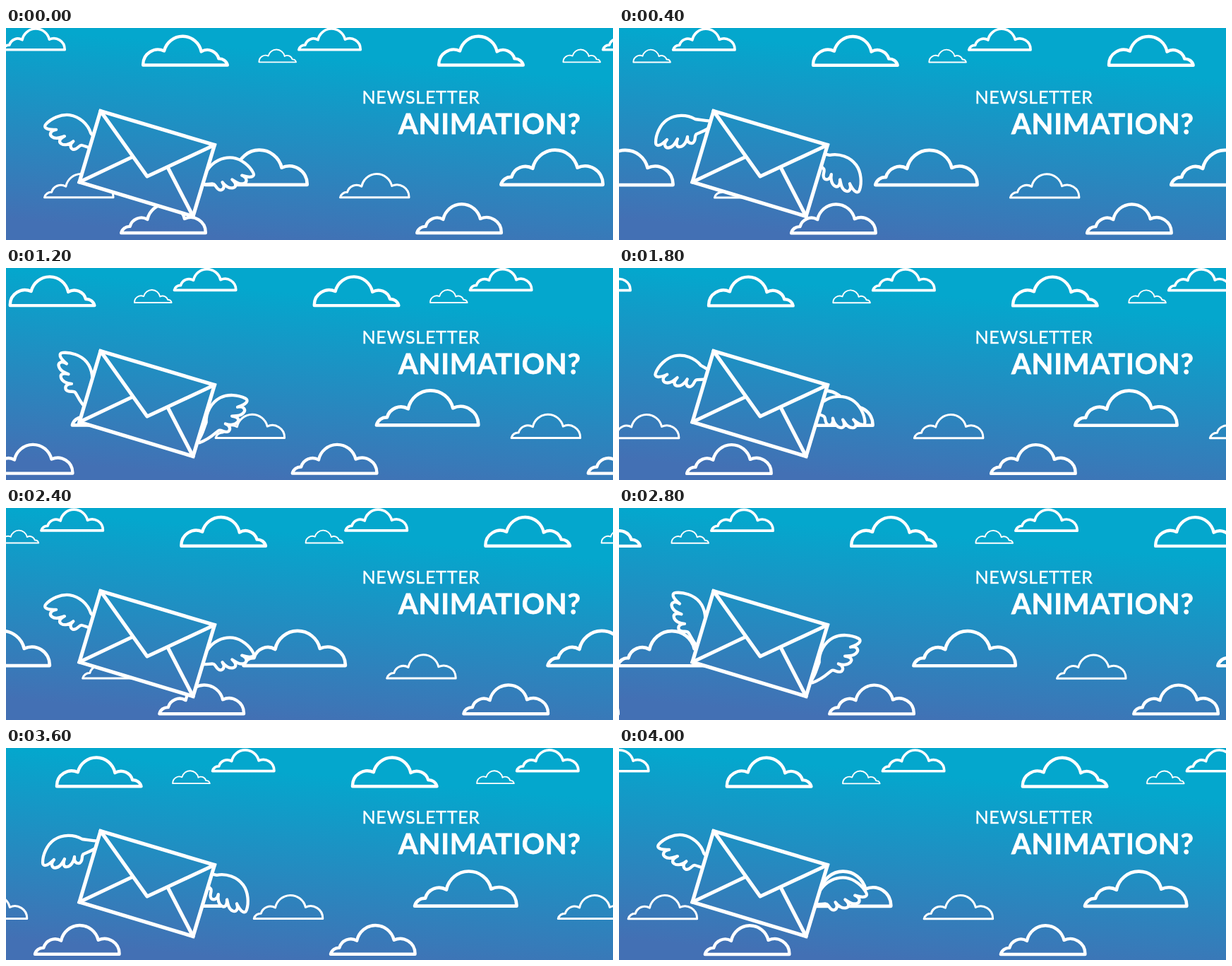
Recreate the animation shown at these times as an HTML page. Size 860 by 300 pixels, loop 4200 ms.

```html
<!DOCTYPE html>
<html lang="en">
<head>
<meta charset="utf-8">
<title>Newsletter animation</title>
<style>
  html, body { margin: 0; width: 100%; height: 100%; overflow: hidden; }
  svg { display: block; width: 860px; height: 300px; }
  .line { fill: url(#sky); stroke: #fff; stroke-linejoin: round; stroke-linecap: round; }
  text { fill: #fff; stroke: #fff; font-family: Lato, "Open Sans", sans-serif; }
</style>
</head>
<body>
<svg viewBox="0 0 860 300">
  <defs>
    <linearGradient id="sky" gradientUnits="userSpaceOnUse" x1="0" y1="0" x2="-23" y2="268">
      <stop offset="0" stop-color="#04a7cd"/>
      <stop offset="1" stop-color="#4370b4"/>
    </linearGradient>
    <linearGradient id="sky0" href="#sky"/>
    <linearGradient id="sky1" href="#sky"/>
    <path id="cloud" vector-effect="non-scaling-stroke"
      d="M2.3 50.3A14 14 0 0 1 17 39.500A20 20 0 0 1 46.500 27.500A32 32 0 0 1 109 26.500A25 25 0 0 1 144.500 49V50.300Z"/>
    <path id="wing"
      d="M50 -24C38 -22 30 -25 20 -26C8 -33 -8 -33 -20 -25C-30 -18 -36 -4 -36 7C-36 13 -30 13 -20 3C-26 10 -22 15 -18 14.500C-12 14 -9 9 -5 2C-8 10 -6 14 -1 13C4 12 8 6 9 -1C8 6 12 9 16 8C22 5 18 -3 22 -5C27 -8 36 -9 50 -21"/>
  </defs>
  <rect width="860" height="300" fill="url(#sky)"/>
  <g id="clouds"></g>
  <g id="wings"></g>
  <g class="line" stroke-width="5.2">
    <path d="M134 117.500L295.500 165.500L265 266.500L104 218Z" stroke-linejoin="miter"/>
    <path d="M134 117.500L200 210L295.500 165.500M104 218L180 182M265 266.500L229 197" fill="none"/>
  </g>
  <text x="504.500" y="107" font-size="25" letter-spacing="0.75" stroke-width="0.4">NEWSLETTER</text>
  <text x="556" y="150" font-size="40" font-weight="700" letter-spacing="0.8" stroke-width="0.8">ANIMATION?</text>
</svg>
<script>
const NS = "http://www.w3.org/2000/svg";
const STEP = 200, STEPS = 21, PERIOD = 850, SPEED = 40.43, SINK = 0.1;

// left, bottom, width, stroke, mirrored
const CLOUDS = [
  [192, 54.7, 124, 4.4, true],
  [-6, 32.6, 91, 3.7, false],
  [-61.5, 49.3, 54.5, 1.9, true],
  [280, 224.2, 149, 4.7, false],
  [53, 241.3, 100.5, 3, false],
  [161, 292.2, 124, 4.4, false]
];

// [x, y, angle] with the wing low, level and high
const WINGS = [
  { flip: 1, low: [88, 155, 0], mid: [88, 155, 42], high: [91, 155, 84] },
  { flip: -1, low: [309, 211, -19], mid: [315, 215, 27], high: [316, 213, 62] }
];

function add(parent, name, attrs) {
  const el = document.createElementNS(NS, name);
  for (const k in attrs) el.setAttribute(k, attrs[k]);
  return parent.appendChild(el);
}

const cloudLayer = document.getElementById("clouds");
const sprites = [];
for (const [left, bottom, width, stroke, mirrored] of CLOUDS) {
  for (const shift of [0, 419]) {
    for (const lap of [0, -PERIOD]) {
      const el = add(cloudLayer, "use", { href: "#cloud", class: "line", "stroke-width": stroke });
      el.style.fill = "none";
      sprites.push({ el, x: left + shift + PERIOD, lap, bottom, width, stroke, mirrored });
    }
  }
}

const wingLayer = document.getElementById("wings");
WINGS.forEach((w, i) => {
  w.el = add(wingLayer, "use", { href: "#wing", class: "line", "stroke-width": 4.3 });
  w.el.style.fill = `url(#sky${i})`;
  w.sky = document.getElementById("sky" + i);
});

function drawCloud(c, step) {
  const x = (c.x + step * SPEED) % PERIOD + c.lap;
  const k = (c.width - c.stroke) / 142.2;
  const y = c.bottom + step * SINK - c.stroke / 2 - 50.3 * k;
  const edge = c.stroke / 2 - 2.3 * k;
  const tx = c.mirrored ? x + c.width - edge : x + edge;
  c.el.setAttribute("transform", `translate(${tx} ${y}) scale(${c.mirrored ? -k : k} ${k})`);
}

function drawWing(w, beat) {
  const end = beat < 0 ? w.low : w.high;
  const [x, y, a] = w.mid.map((v, i) => v + (end[i] - v) * Math.abs(beat));
  w.el.setAttribute("transform", `translate(${x} ${y}) scale(${w.flip} 1) rotate(${a})`);
  // undo the pose for the fill, so it blends with the sky
  w.sky.setAttribute("gradientTransform", `rotate(${-a}) scale(${w.flip} 1) translate(${-x} ${-y})`);
}

function draw(time) {
  const step = Math.floor(time / STEP) % STEPS;
  const phase = step % 8;
  const beat = phase <= 4 ? Math.abs(phase - 2) / 2 - 1 : 1 - Math.abs(phase - 6) / 2;
  for (const c of sprites) drawCloud(c, step);
  for (const w of WINGS) drawWing(w, beat);
}

const start = performance.now();
function tick() {
  draw(performance.now() - start);
  requestAnimationFrame(tick);
}
draw(0);
requestAnimationFrame(tick);
</script>
</body>
</html>
```
